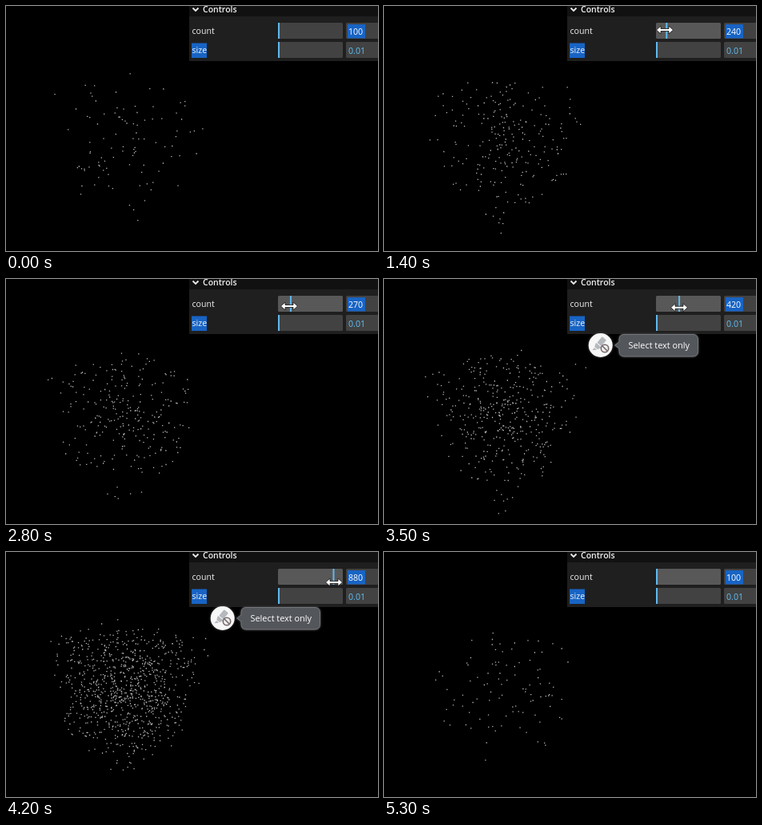
An HTML page that plays this animation: 465 by 307 pixels, repeating every 5.4 s.

```html
<!DOCTYPE html>
<html lang="en">
<head>
<meta charset="utf-8">
<title>Particle controls</title>
<style>
  html, body { margin: 0; width: 100%; height: 100%; overflow: hidden; background: #000; }
  svg { display: block; width: 100vw; height: 100vh; }
  text { font: 10.6px "Open Sans", "Noto Sans", sans-serif; fill: #f2f2f2; }
  .title { font-weight: 600; font-size: 10.5px; }
  .value { fill: #60c2fa; }
  .selected { fill: #fff; }
  .mark { fill: #1864c4; }
  .field { fill: #424242; }
  .accent { fill: #60b9ef; }
  #hint text { font-size: 10.9px; fill: #fff; }
  #hint { filter: drop-shadow(0 0 1.5px #555); }
</style>
</head>
<body>
<svg viewBox="0 0 465 307">
  <path id="cloud" fill="none" stroke="#b8b8b8" stroke-width="1.3"/>

  <rect x="229" width="236" height="69" fill="#1f1f1f"/>
  <rect x="229" width="236" height="13" fill="#111"/>
  <path d="M233.5 2.5l3.5 3.5 3.5-3.5" fill="none" stroke="#ebebeb" stroke-width="1.8"/>
  <text class="title" x="246" y="8">Controls</text>

  <text x="232.5" y="35">count</text>
  <rect id="track" x="340" y="21" width="81" height="20" rx="1.5"/>
  <rect id="thumb" class="accent" y="21" width="2" height="20"/>
  <rect class="field" x="425" y="21" width="45" height="20" rx="1.5"/>
  <rect class="mark" x="427" y="23" width="22" height="17.5"/>
  <text id="count" class="selected" x="428" y="35.5"></text>

  <rect class="mark" x="232" y="46.5" width="19" height="18.5"/>
  <text x="232.5" y="59">size</text>
  <rect class="field" x="340" y="45" width="81" height="20" rx="1.5"/>
  <rect class="accent" x="340" y="45" width="2" height="20"/>
  <rect class="field" x="425" y="45" width="45" height="20" rx="1.5"/>
  <text class="value" x="428" y="59.5">0.01</text>

  <g id="hint">
    <circle cx="270.7" cy="83" r="15" fill="#f7f7f7"/>
    <g transform="translate(269 82) rotate(40)" fill="#b5b8bc">
      <rect x="-3.5" y="-10" width="7" height="10" rx="1"/>
      <path d="M-4.5 1h9l-2 5h-5zM-2 7h4l-4 4z"/>
    </g>
    <g fill="#eee" stroke="#77696b" stroke-width="1.6">
      <circle cx="276" cy="87" r="4.7"/>
      <path d="M272.8 83.8l6.4 6.4"/>
    </g>
    <path d="M300 69.5h86q6.5 0 6.5 6.5v14.5q0 6.5-6.5 6.5h-86q-6 0-6-6.5V87l-5.5-4 5.5-4v-3q0-6.5 6-6.5z"
          fill="#53565b" stroke="#74777b"/>
    <text x="305.5" y="87">Select text only</text>
  </g>

  <path id="cursor" d="M-10.5 0l5.5-5v3.5H5V-5l5.5 5L5 5V1.5H-5V5z"
        fill="#fff" stroke="#111" stroke-width=".8"/>
</svg>
<script>
const LOOP = 5400, TICK = 100;
const MIN = 100, MAX = 1000, STEP = 10;
const CENTER = { x: 150, y: 172 };
const FOCAL = 230, SPREAD = 3, DISTANCE = Math.sqrt(27);
const HOVER = [300, LOOP], CURSOR = [300, 5000], HINT = [3500, 5100];

// Each drag continues from where the previous one stopped.
const rest = { count: 100, x: 345, y: 38 };
const drags = [
  { from: 300, to: 1100, count: 100, x: 341, y: 30 },
  { from: 1200, to: 1400, count: 240, x: 351, y: 30 },
  { from: 2300, to: 2800, count: 270, x: 354, y: 34 },
  { from: 2900, to: 3100, count: 320, x: 360, y: 35 },
  { from: 3400, to: 3800, count: 710, x: 396, y: 38 },
  { from: 3800, to: 4200, count: 880, x: 410, y: 38 },
  { from: 4200, to: 4700, count: 140, x: 324, y: 54 },
  { from: 4700, to: 5300, count: 100, x: 316, y: 56 }
];

const el = id => document.getElementById(id);
const within = (time, [from, to]) => time >= from && time < to;
const show = (id, on) => el(id).setAttribute("visibility", on ? "visible" : "hidden");

function poseAt(time) {
  const index = drags.findLastIndex(drag => drag.from < time);
  if (index < 0) return { ...rest, index: 0 };
  const drag = drags[index], before = drags[index - 1] ?? rest;
  const progress = Math.min(1, (time - drag.from) / (drag.to - drag.from));
  const mix = key => before[key] + (drag[key] - before[key]) * progress;
  return { count: Math.round(mix("count") / STEP) * STEP, x: mix("x"), y: mix("y"), index };
}

function randomFrom(seed) {
  return () => {
    seed = (seed + 0x6D2B79F5) | 0;
    let n = Math.imul(seed ^ (seed >>> 15), 1 | seed);
    n = (n + Math.imul(n ^ (n >>> 7), 61 | n)) ^ n;
    return ((n ^ (n >>> 14)) >>> 0) / 2 ** 32;
  };
}

// Random points in a cube, seen along its diagonal.
function cloudPath(count, seed) {
  const random = randomFrom(seed);
  const coord = () => (random() - 0.5) * SPREAD;
  let path = "";
  for (let i = 0; i < count; i++) {
    const x = coord(), y = coord(), z = coord();
    const scale = FOCAL / (DISTANCE - (x + y + z) / Math.sqrt(3));
    const px = CENTER.x + scale * (x - z) / Math.SQRT2;
    const py = CENTER.y - scale * (2 * y - x - z) / Math.sqrt(6);
    path += `M${px.toFixed(1)} ${py.toFixed(1)}h1.3`;
  }
  return path;
}

let shownSeed;
function render(time) {
  const { count, x, y, index } = poseAt(Math.floor(time / TICK) * TICK);
  const seed = count * 31 + index;
  if (seed !== shownSeed) {
    shownSeed = seed;
    el("cloud").setAttribute("d", cloudPath(count, seed));
    el("count").textContent = count;
    el("thumb").setAttribute("x", 340 + 79 * (count - MIN) / (MAX - MIN));
  }
  el("track").setAttribute("fill", within(time, HOVER) ? "#585858" : "#424242");
  el("cursor").setAttribute("transform", `translate(${x} ${y})`);
  show("cursor", within(time, CURSOR));
  show("hint", within(time, HINT));
}

const start = performance.now();
function tick() {
  render((performance.now() - start) % LOOP);
  requestAnimationFrame(tick);
}
tick();
</script>
</body>
</html>
```
